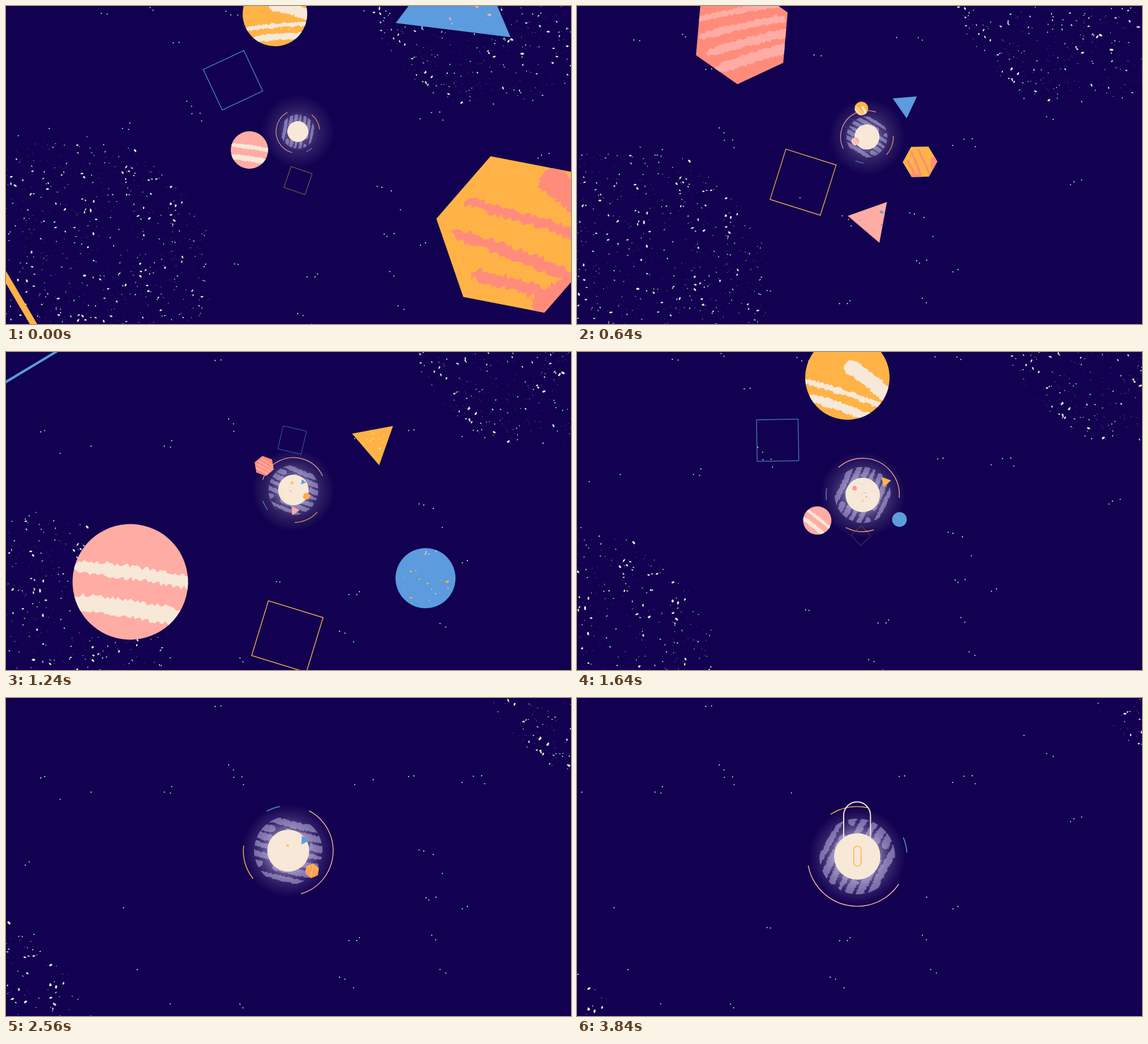
Write an HTML page with a canvas that moves like this. It is 998 by 561 pixels and loops after 3880 ms.

```html
<!DOCTYPE html>
<html lang="en">
<head>
<meta charset="utf-8">
<title>Space</title>
<style>
html, body { margin: 0; width: 100%; height: 100%; overflow: hidden; background: #120150; }
canvas { display: block; }
</style>
</head>
<body>
<canvas id="stage" width="998" height="561"></canvas>
<script>
const ctx = document.getElementById('stage').getContext('2d');
const W = 998, H = 561, STEP = 40, STEPS = 97, LENGTH = 3840, HOLD = 9;
const SPIN = 0.075, TAU = Math.PI * 2;
const BG = '#120150', ORANGE = '#ffb347', SALMON = '#ff8c7b', PINK = '#ffaca4',
      BLUE = '#5b9bde', CREAM = '#f7e8d8';
const rad = d => d * Math.PI / 180;
const mix = (a, b, f) => a + (b - a) * f;
const clamp = v => Math.min(1, Math.max(0, v));
const easeOut = v => 1 - (1 - clamp(v)) ** 3;
const times = (n, fn) => Array.from({ length: n }, (_, i) => fn(i));

function random(seed) {
  return () => {
    seed = (seed + 0x6d2b79f5) | 0;
    let v = Math.imul(seed ^ (seed >>> 15), 1 | seed);
    v = (v + Math.imul(v ^ (v >>> 7), 61 | v)) ^ v;
    return ((v ^ (v >>> 14)) >>> 0) / 4294967296;
  };
}

// ---- textures, built once in unit coordinates ----
function polygon(n, start) {
  const p = new Path2D();
  for (let i = 0; i < n; i++) {
    const a = rad(start) + i * TAU / n;
    p.lineTo(Math.cos(a), Math.sin(a));
  }
  p.closePath();
  return p;
}

// Dry brush strokes: [x0, y0, x1, y1, width]
function brush(strokes, rough, seed) {
  const p = new Path2D(), rnd = random(seed), n = 46;
  for (const [x0, y0, x1, y1, w] of strokes) {
    const len = Math.hypot(x1 - x0, y1 - y0), nx = (y0 - y1) / len, ny = (x1 - x0) / len;
    const edge = (i, side) => {
      const f = i / n, taper = Math.min(1, 0.45 + f * 5);
      const d = side * w / 2 * taper + (rnd() - 0.5) * rough - 0.03 * Math.sin(f * Math.PI);
      return [mix(x0, x1, f) + nx * d, mix(y0, y1, f) + ny * d];
    };
    for (let i = 0; i <= n; i++) {
      const q = edge(i, -1);
      i ? p.lineTo(...q) : p.moveTo(...q);
    }
    for (let i = n; i >= 0; i--) p.lineTo(...edge(i, 1));
    p.closePath();
  }
  return p;
}

// Full-width rows; some are broken in the middle
function rows(n, rough, seed) {
  const rnd = random(seed);
  return brush(times(n, i => {
    const y = mix(-0.8, 0.8, i / (n - 1)), w = (0.75 + rnd() * 0.6) * 1.15 / n;
    if (i % 3 === 0) return [[-1, y, 1, y, w]];
    const gap = rnd() - 0.5;
    return [[-1, y, gap - 0.15, y, w], [gap + 0.15, y, 1, y, w]];
  }).flat(), rough, seed);
}

function chip(p, x, y, size, rnd) {
  const a = rnd() * TAU;
  for (let i = 0; i < 5; i++) {
    const b = a + i * TAU / 5, r = size * (0.6 + rnd() * 0.6);
    const u = Math.cos(b) * r * 1.3, v = Math.sin(b) * r * 0.75;
    const px = x + u * Math.cos(a) - v * Math.sin(a), py = y + u * Math.sin(a) + v * Math.cos(a);
    i ? p.lineTo(px, py) : p.moveTo(px, py);
  }
  p.closePath();
}

// Chips spread evenly over a disc
function specks(n, reach, size, seed) {
  const p = new Path2D(), rnd = random(seed);
  for (let i = 0; i < n; i++) {
    const a = rnd() * TAU, d = reach * Math.sqrt(rnd());
    chip(p, Math.cos(a) * d, Math.sin(a) * d, size * (0.25 + rnd() ** 2), rnd);
  }
  return p;
}

const disc = new Path2D();
disc.arc(0, 0, 1, 0, TAU);
const tri = polygon(3, 0);

const kinds = {
  amber: { shape: disc, fill: ORANGE, ink: CREAM, art: brush([
    [-0.15, -0.3, 1.05, 0.08, 0.34], [-1, 0.43, 1, 0.36, 0.13], [-0.75, 0.75, 0.8, 0.72, 0.2]], 0.06, 3) },
  rose: { shape: disc, fill: PINK, ink: CREAM, art: brush([
    [-1.02, -0.13, 1.02, -0.13, 0.22], [-1, 0.49, 1, 0.5, 0.29]], 0.08, 5) },
  hex: { shape: polygon(6, 11), fill: ORANGE, ink: SALMON, art: brush([
    [-0.64, -0.4, 0.95, 0.1, 0.12], [-0.8, -0.03, 0.95, 0.65, 0.15], [-0.56, 0.47, 0.62, 0.83, 0.15],
    [0.3, -0.72, 0.98, -0.2, 0.34], [0.2, 0.92, 0.66, 0.62, 0.24]], 0.07, 4) },
  coral: { shape: polygon(6, 0), fill: SALMON, ink: PINK, art: brush(
    times(4, i => [-0.8, -0.65 + i * 0.36, 0.9, -0.22 + i * 0.3, 0.11 + i * 0.03]), 0.05, 9) },
  azure: { shape: disc, fill: BLUE, ink: ORANGE, art: specks(15, 0.95, 0.075, 8) },
  blueTri: { shape: tri, fill: BLUE, ink: PINK, art: specks(22, 0.7, 0.032, 21) },
  pinkTri: { shape: tri, fill: PINK, ink: BLUE, art: specks(10, 0.6, 0.06, 13) },
  goldTri: { shape: tri, fill: ORANGE, ink: CREAM, art: specks(12, 0.55, 0.045, 17) },
  blueBox: { box: BLUE },
  goldBox: { box: ORANGE }
};

// ---- sun ----
const growth = t => Math.sin(t / LENGTH * Math.PI / 2) ** 1.34;
function sunAt(t) {
  const g = growth(t);
  return { g, x: mix(515.5, 495, g), y: mix(221.5, 279.5, g), r: mix(18.5, 41, g) };
}

// ---- flight: everything shrinks towards the sun along one shared zoom ----
const zoomKeys = [[0, 0], [360, 0.83], [920, 2.01], [1240, 2.82], [2000, 5.25], [2560, 7.25]];
function zoom(t) {
  const i = Math.max(1, zoomKeys.findIndex(k => k[0] >= t)), last = zoomKeys.length - 1;
  const n = t > zoomKeys[last][0] ? last : i, [t0, z0] = zoomKeys[n - 1], [t1, z1] = zoomKeys[n];
  return mix(z0, z1, (t - t0) / (t1 - t0));
}

const bodies = [];
// Each body is placed once: kind, x, y, size and turn at the given time
function place(t, ...list) {
  const sun = sunAt(t);
  for (const [kind, x, y, size, turn] of list) {
    const dx = x - sun.x, dy = y - sun.y, dist = Math.hypot(dx, dy);
    bodies.unshift({
      ...kinds[kind], size, turn, start: t, dir: Math.atan2(dy, dx),
      dist: Math.log(dist), rim: Math.log(Math.max(dist, 250))
    });
  }
}
place(0, ['rose', 430, 254, 33, 8], ['goldBox', 516, 308, 39, 19], ['blueBox', 401, 131, 79, -25],
  ['amber', 475, 14, 57, -3], ['blueTri', 797, -16, 118, 37], ['hex', 903.5, 403, 146, 0]);
place(360, ['goldBox', 310.5, 370, 178, -3.5], ['pinkTri', 528, 491, 81, 49.4]);
place(920, ['blueBox', 505.5, 38.5, 102, -11], ['coral', 394, 141, 44, -4], ['goldTri', 833, 44.6, 103.6, 55.4]);
place(1240, ['goldBox', 497, 502, 101, 17], ['azure', 741, 399, 53, 24],
  ['rose', 219.5, 405.5, 102, 8], ['blueBox', -32, -103, 300, -31]);
place(2000, ['amber', 493.5, 194, 21, 47], ['blueTri', 709, 125, 81, 82], ['hex', 812.5, 522, 117, 45]);

function drawBody(body, sun, t) {
  // Beyond the rim a body rushes in faster
  let dist = body.dist + zoom(body.start) - zoom(t);
  dist += Math.max(0, dist - body.rim) * 0.65;
  const size = body.size * Math.exp((dist - body.dist) * 1.1), d = Math.exp(dist);
  if (size < 0.6 || d > 1600) return;
  ctx.save();
  ctx.translate(sun.x + Math.cos(body.dir) * d, sun.y + Math.sin(body.dir) * d);
  ctx.rotate(rad(body.turn + (t - body.start) * SPIN));
  ctx.scale(size, size);
  if (body.box) {
    ctx.strokeStyle = body.box;
    ctx.lineWidth = 0.014;
    ctx.strokeRect(-0.5, -0.5, 1, 1);
  } else {
    ctx.fillStyle = body.fill;
    ctx.fill(body.shape);
    ctx.clip(body.shape);
    ctx.fillStyle = body.ink;
    ctx.fill(body.art);
  }
  ctx.restore();
}

// ---- star dust clouds: circles [x, y, r] that drift outwards ----
function cloud(n, from, to, seed) {
  const rnd = random(seed), bright = new Path2D(), dim = new Path2D();
  for (let i = 0; i < n; i++) {
    const a = rnd() * TAU, d = Math.sqrt(rnd()) * from[2], big = rnd() < 0.45;
    chip(big ? bright : dim, Math.cos(a) * d, Math.sin(a) * d,
      big ? 0.8 + rnd() ** 2 * 2 : 0.4 + rnd() * 0.4, rnd);
  }
  return { from, to, bright, dim };
}
const clouds = [
  cloud(1250, [125, 470, 240], [-180, 695, 290], 31),
  cloud(1080, [865, -40, 223], [1160, -145, 290], 47)
];
function drawCloud({ from, to, bright, dim }, g) {
  const p = g ** 1.25, [x, y, r] = from.map((v, i) => mix(v, to[i], p));
  ctx.save();
  ctx.translate(x, y);
  ctx.scale(r / from[2], r / from[2]);
  ctx.fillStyle = CREAM;
  ctx.fill(bright);
  ctx.globalAlpha = 0.5;
  ctx.fill(dim);
  ctx.restore();
}

// ---- small stars: one sheet of loose groups that jumps between four places ----
const jumps = [[68, 50], [0, 97], [0, 0], [142, 0]];
const rndStar = random(12);
const stars = times(44, () => {
  const x = mix(-142, W, rndStar()), y = mix(-97, H, rndStar());
  return times(1 + Math.floor(rndStar() * 3), i =>
    [x + i * (5 + rndStar() * 10), y + i * (rndStar() - 0.4) * 16]);
}).flat();
function drawStars(n, sun) {
  const [ox, oy] = jumps[Math.floor(n / HOLD) % jumps.length];
  ctx.fillStyle = '#e9e4f2';
  ctx.beginPath();
  for (const [sx, sy] of stars) {
    const x = sx + ox, y = sy + oy;
    if (Math.hypot(x - sun.x, y - sun.y) < 140) continue;
    ctx.moveTo(x, y);
    ctx.arc(x, y, 1.05, 0, TAU);
  }
  ctx.fill();
}

// ---- halo, orbit arcs and lock ----
const haze = rows(7, 0.05, 74);
const orbits = [[106, 241, '#eaa39f'], [-50, -6, '#eba550'], [50, 67, '#5590d6']];

function drawHalo({ g, x, y, r }, t, n) {
  const outer = mix(63, 84, g), rings = 11;
  ctx.fillStyle = '#ded6f4';
  for (let i = 0; i < rings; i++) {
    ctx.globalAlpha = (0.022 + 0.00009 * i ** 3) * mix(0.7, 1.1, g);
    ctx.beginPath();
    ctx.arc(x, y, mix(outer, r, i / rings), 0, TAU);
    ctx.fill();
  }
  ctx.save();
  ctx.translate(x, y);
  ctx.rotate(rad(100 - 117 * Math.floor(n / HOLD) + t * SPIN));
  ctx.scale(r * 1.63, r * 1.63);
  ctx.clip(disc);
  ctx.globalAlpha = 0.47;
  ctx.fillStyle = '#cdc5eb';
  ctx.fill(haze);
  ctx.restore();
  ctx.globalAlpha = 1;
  ctx.lineWidth = mix(1.1, 1.7, g);
  ctx.lineCap = 'round';
  for (const [a, b, color] of orbits) {
    ctx.strokeStyle = color;
    ctx.beginPath();
    ctx.arc(x, y, mix(38.5, 88, g), rad(a + t * SPIN), rad(b + t * SPIN));
    ctx.stroke();
  }
}

function drawLock({ x, y, r }, t) {
  const lift = easeOut((t - 2950) / 450), key = easeOut((t - 3150) / 450);
  if (lift > 0) {
    ctx.strokeStyle = CREAM;
    ctx.lineWidth = 2;
    ctx.beginPath();
    ctx.moveTo(x - 24, y);
    ctx.arc(x - 0.3, y - 72.5 * lift, 23.7, Math.PI, 0);
    ctx.lineTo(x + 23.4, y);
    ctx.stroke();
  }
  ctx.fillStyle = CREAM;
  ctx.beginPath();
  ctx.arc(x, y, r, 0, TAU);
  ctx.fill();
  if (key > 0) {
    ctx.strokeStyle = ORANGE;
    ctx.lineWidth = 1.6;
    ctx.beginPath();
    ctx.roundRect(x + 0.3 - 6.5 * key, y - 0.5 - 17.7 * key, 13 * key, 35.4 * key, 6.5 * key);
    ctx.stroke();
  }
}

function draw(now) {
  const n = Math.floor(now / STEP) % STEPS, t = n * STEP, sun = sunAt(t);
  ctx.fillStyle = BG;
  ctx.fillRect(0, 0, W, H);
  clouds.forEach(c => drawCloud(c, sun.g));
  drawHalo(sun, t, n);
  drawLock(sun, t);
  bodies.forEach(b => drawBody(b, sun, t));
  drawStars(n, sun);
}

const begin = performance.now();
function loop() {
  draw(performance.now() - begin);
  requestAnimationFrame(loop);
}
loop();
</script>
</body>
</html>
```
